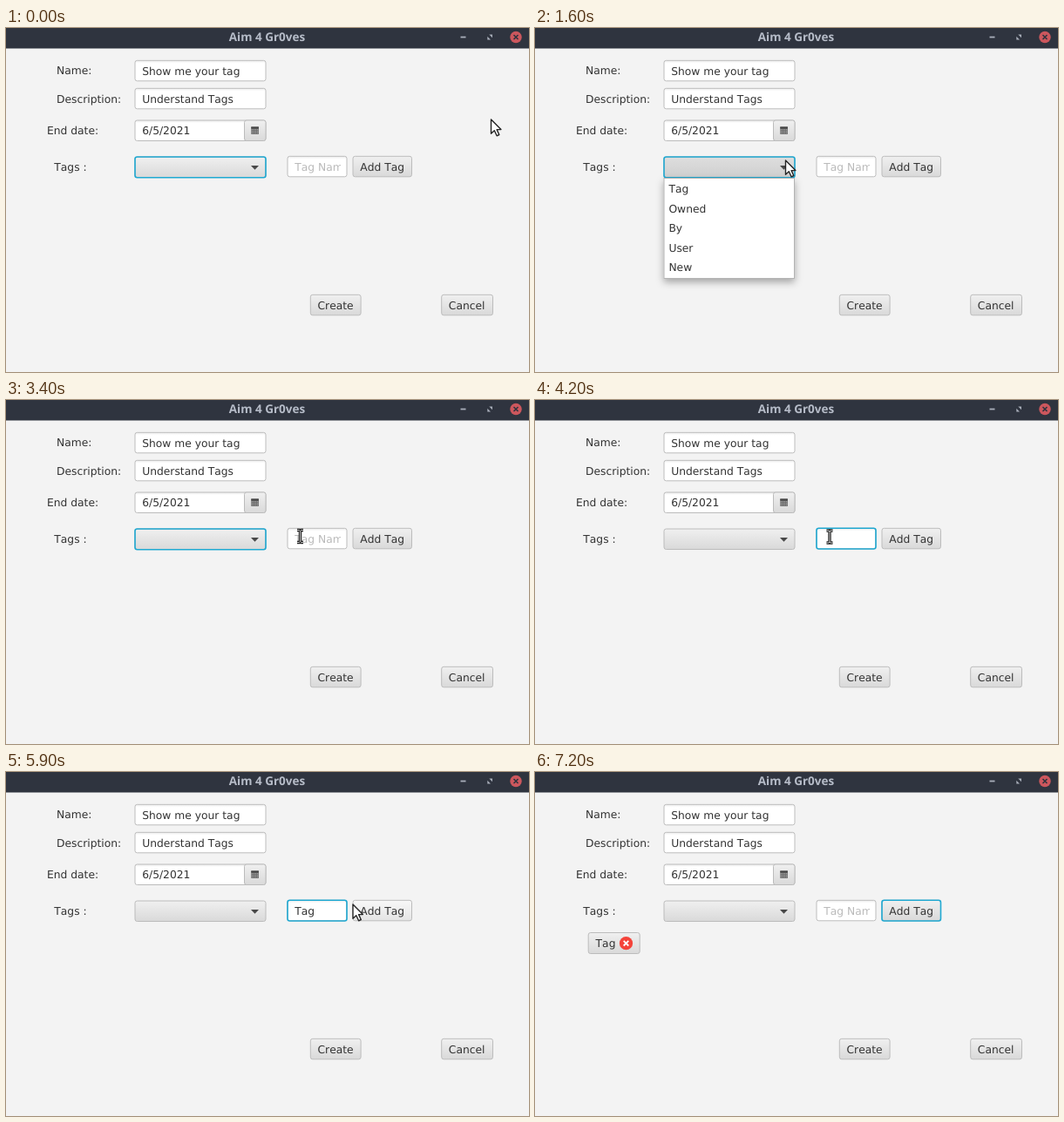
Recreate the animation shown at these times as an HTML page. Size 600 px wide and 395 px high, loop 8.6 s.

```html
<!DOCTYPE html>
<html lang="en">
<head>
<meta charset="utf-8">
<title>Tag form</title>
<style>
  html, body { margin: 0; width: 100%; height: 100%; overflow: hidden; background: #f3f3f3; }
  svg { display: block; width: 600px; height: 395px; }
  text {
    font: 12.3px "DejaVu Sans", sans-serif; font-kerning: none;
    text-rendering: geometricPrecision; fill: #333; white-space: pre;
  }
  .title { font: bold 13.5px "Noto Sans", sans-serif; fill: #b6bcc8; text-anchor: middle; }
  .prompt { fill: #bababa; }
  .edge { fill: none; stroke: #bcbcbc; }
  .ring { fill: none; stroke: #20a9d2; stroke-width: 1.6; }
</style>
</head>
<body>
<svg id="stage" viewBox="0 0 600 395">
  <defs>
    <linearGradient id="face" x2="0" y2="1">
      <stop stop-color="#f0f0f0"/><stop offset="1" stop-color="#d9d9d9"/>
    </linearGradient>
    <linearGradient id="hover" x2="0" y2="1">
      <stop stop-color="#f8f8f8"/><stop offset="1" stop-color="#e4e4e4"/>
    </linearGradient>
    <linearGradient id="down" x2="0" y2="1">
      <stop stop-color="#dedede"/><stop offset="1" stop-color="#cfcfcf"/>
    </linearGradient>
    <linearGradient id="paper" x2="0" y2="1">
      <stop stop-color="#ececec"/><stop offset=".14" stop-color="#fff"/>
    </linearGradient>
    <filter id="shade" x="-10%" y="-10%" width="120%" height="130%">
      <feDropShadow dx="0" dy="4" stdDeviation="4" flood-opacity=".32"/>
    </filter>
    <clipPath id="fieldClip"><rect x="330" y="148" width="54" height="23"/></clipPath>
  </defs>
</svg>
<script>
const NS = "http://www.w3.org/2000/svg";
const stage = document.getElementById("stage");
const LOOP = 8600;

function add(tag, attrs, parent = stage) {
  const el = document.createElementNS(NS, tag);
  for (const key in attrs) el.setAttribute(key, attrs[key]);
  return parent.appendChild(el);
}

function label(x, y, str, parent, cls = "") {
  const el = add("text", { x, y, class: cls }, parent);
  el.textContent = str;
  return el;
}

function box(x, y, width, height, fill, parent) {
  const rect = { x, y, width, height, rx: 2.5 };
  const body = add("rect", { ...rect, fill: `url(#${fill})` }, parent);
  add("rect", { ...rect, class: "edge" }, parent);
  return body;
}

const ring = (x, y, width, height) =>
  add("rect", { x, y, width, height, rx: 2.5, class: "ring" });

const path = (d, attrs, parent) => add("path", { d, fill: "none", ...attrs }, parent);
const show = (el, on) => el.setAttribute("visibility", on ? "visible" : "hidden");

// Title bar
add("rect", { width: 600, height: 23.5, fill: "#2f343f" });
label(299.5, 15, "Aim 4 Gr0ves", stage, "title");
path("M521.5 10.5h6", { stroke: "#a9afba", "stroke-width": 1.8 });
path("M554.3 7.5h3.7v3.7zM552.3 9.8v3.7h3.7z", { fill: "#a9afba" });
add("circle", { cx: 585, cy: 10.5, r: 6.7, fill: "#cc575d" });
path("M582.5 8l5 5m0-5l-5 5", { stroke: "#2f343f", "stroke-width": 1.6 });

// Form
label(58, 53, "Name:");
label(58, 86, "Description:");
label(47, 121.5, "End date:");
label(55.3, 164, "Tags :");

box(148, 37.3, 150, 23.5, "paper");
label(156.2, 53.5, "Show me your tag");
box(148, 69.3, 150, 23.5, "paper");
label(156.2, 86, "Understand Tags");

box(148, 106, 150, 23.5, "paper");
box(273.5, 106, 24.5, 23.5, "face");
label(156.2, 122, "6/5/2021");
add("rect", { x: 281.3, y: 113.5, width: 8.6, height: 8.5, fill: "#666" });
path("M281.3 114.5h8.6", { stroke: "#444", "stroke-width": 2 });
path("M282 116.7h7.4M282 118.7h7.4M282 120.7h7.4",
  { stroke: "#bbb", "stroke-width": .9, "stroke-dasharray": "1.2 .8" });

const combo = box(148, 148, 150, 23.5, "face");
const comboRing = ring(148, 148, 150, 23.7);
path("M281 158h9l-4.5 4.8z", { fill: "#484848" });

box(323, 147.3, 68, 23.5, "paper");
const fieldRing = ring(323, 147.3, 68, 23.7);
const fieldText = add("g", { "clip-path": "url(#fieldClip)" });
const prompt = label(331.3, 164, "Tag Name", fieldText, "prompt");
const typed = label(331.3, 164, "", fieldText);
const caret = add("rect", { y: 152.5, width: 1, height: 14, fill: "#333" });

const addButton = box(398, 147.3, 67.5, 23.5, "face");
const addRing = ring(398, 147.3, 67.5, 23.7);
label(406.3, 164, "Add Tag");

box(349.3, 306.3, 57.8, 23.5, "face");
label(357.5, 322.8, "Create");
box(499.7, 306.3, 58.8, 23.5, "face");
label(507.8, 322.8, "Cancel");

// Chip
const chip = add("g", {});
box(61.2, 184.5, 59, 24, "face", chip);
label(69.6, 201, "Tag", chip);
add("circle", { cx: 104.5, cy: 196.7, r: 7.6, fill: "#f4433a" }, chip);
path("M101.7 193.9l5.6 5.6m0-5.6l-5.6 5.6", { stroke: "#fff", "stroke-width": 1.8 }, chip);

// Drop-down list
const list = add("g", {});
add("rect", { x: 148, y: 172.5, width: 149.5, height: 115, fill: "#fff", stroke: "#b4b4b4", filter: "url(#shade)" }, list);
["Tag", "Owned", "By", "User", "New"].forEach((item, i) =>
  label(153.4, 189 + i * 22.6, item, list));

// Pointers, both with the hot spot at 0,0
const arrow = path("M0 0V16.2L3.8 12.7L6.6 18.8L9.3 17.5L6.6 11.6H11.4Z",
  { fill: "#fff", stroke: "#252525", "stroke-width": 1.4, "stroke-linejoin": "round" });
const beam = add("g", {});
const beamShape = "M-3.5-7H-1L0-6L1-7H3.5M0-6V6M-3.5 7H-1L0 6L1 7H3.5";
path(beamShape, { stroke: "#252525", "stroke-width": 3.4 }, beam);
path(beamShape, { stroke: "#d5d5d5", "stroke-width": .9 }, beam);

// Pointer stops: time, x, y
const stops = [
  [0, 556.5, 105], [100, 545, 107], [200, 511, 111], [300, 461, 117],
  [400, 408, 124], [500, 362, 129], [600, 332.5, 133.7], [700, 310, 141],
  [800, 296, 147], [900, 289, 151], [1000, 287.5, 152],
  [2900, 291, 153], [3000, 301, 154], [3100, 313, 155], [3200, 325, 156],
  [3300, 334, 156], [3400, 337.5, 156.5], [3600, 338, 157],
  [5500, 347.5, 142], [5600, 356, 141], [5700, 370, 143], [5800, 385, 146],
  [5900, 398, 152], [6000, 405, 158], [6100, 408.5, 162],
  [7000, 450, 150], [7100, 540, 122], [7200, -50, -50]
];

// Field contents from the moment of each keystroke
const keys = [[0, ""], [4600, "T"], [4800, "Ta"], [5000, "Tag"], [6600, ""]];

const at = (table, t) => table.findLast(row => row[0] <= t);
const within = (t, from, to) => t >= from && t < to;
const inside = (x, y, left, right) => x >= left && x <= right && y >= 148 && y <= 171;

function draw(t) {
  const [, x, y] = at(stops, t);
  const str = at(keys, t)[1];
  const open = within(t, 1600, 2600);
  const typing = within(t, 3800, 6400);
  const overField = inside(x, y, 323, 391);

  show(list, open);
  show(comboRing, t < 3800);
  show(fieldRing, typing);
  show(addRing, t >= 6400);
  show(chip, t >= 6600);
  combo.setAttribute("fill", `url(#${open ? "down" : inside(x, y, 148, 298) ? "hover" : "face"})`);
  addButton.setAttribute("fill",
    `url(#${within(t, 6400, 6600) ? "down" : inside(x, y, 398, 466) ? "hover" : "face"})`);

  typed.textContent = str;
  show(prompt, !str && !typing);
  show(caret, within(t, 3800, 4200) || within(t, 4600, 5500));
  caret.setAttribute("x", 331.3 + (str ? typed.getComputedTextLength() : 0));

  show(arrow, !overField);
  show(beam, overField);
  for (const pointer of [arrow, beam]) pointer.setAttribute("transform", `translate(${x} ${y})`);
}

const start = performance.now();
function tick() {
  draw((performance.now() - start) % LOOP);
  requestAnimationFrame(tick);
}
tick();
</script>
</body>
</html>
```
